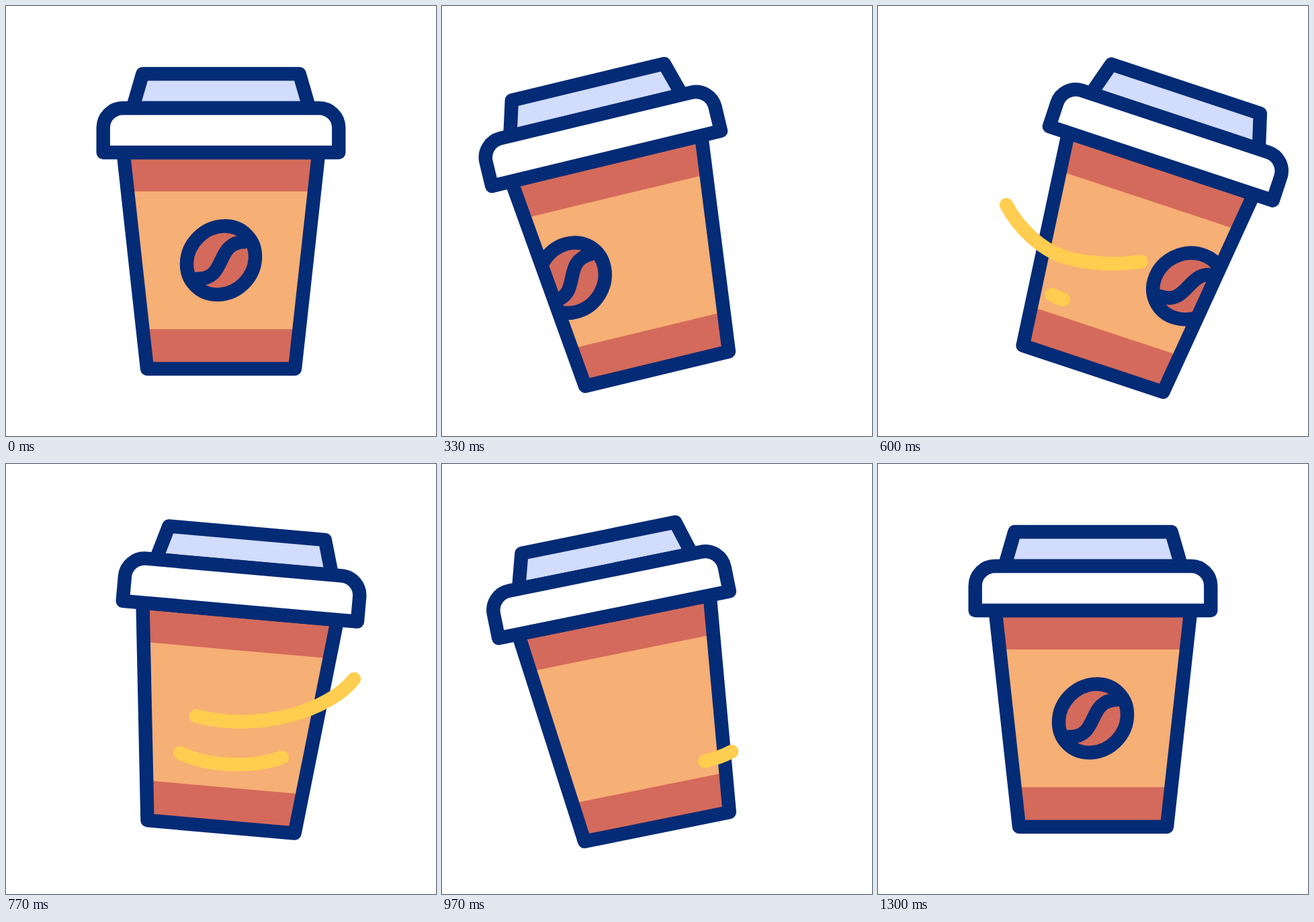
An HTML page for the animation above (2000 ms loop, 640x640 px).

```html
<!DOCTYPE html>
<html lang="en">
<head>
<meta charset="utf-8">
<title>Coffee cup</title>
<style>
  html, body { margin: 0; height: 100%; overflow: hidden; background: #fff; }
  svg { display: block; width: 100%; height: 100%; }
  .line { stroke: #042b76; stroke-width: 20.4; stroke-linejoin: round; stroke-linecap: round; }
  .swoosh { fill: none; stroke: #ffcd4f; stroke-width: 20.4; stroke-linecap: round; }
</style>
</head>
<body>
<svg viewBox="0 0 640 640">
  <clipPath id="body"><path d="M174.6 218H465.4L430 540H210Z"/></clipPath>
  <g id="cup">
    <g clip-path="url(#body)">
      <path fill="#d46a5b" d="M160 210H480V545H160Z"/>
      <path fill="#f6af74" d="M160 276H480V481H160Z"/>
      <g id="bean" class="line" fill="#d46a5b">
        <ellipse rx="53.7" ry="48.2" transform="translate(320 378.6) rotate(-45)"/>
        <path fill="none" d="M284 406C330 408 310 351 356 351"/>
      </g>
    </g>
    <g class="line">
      <path fill="none" d="M174.6 218H465.4L430 540H210Z"/>
      <path fill="#d2dcfd" d="M188.5 152L203.3 101H436.7L451.5 152Z"/>
      <path fill="#fff" d="M144.7 218V181.5A29.3 29.3 0 0 1 174 152H466A29.3 29.3 0 0 1 495.3 181.5V218Z"/>
    </g>
  </g>
  <path class="swoosh" d="M191 296C208 328 243 366 286 376C380 399 482 366 518 320"/>
  <path class="swoosh" d="M259 430C305 452 380 455 431 428"/>
</svg>
<script>
  const LOOP = 2000;
  const cup = document.getElementById('cup');
  const bean = document.getElementById('bean');
  const swooshes = [...document.querySelectorAll('.swoosh')].map((path, i) => ({
    path, length: path.getTotalLength(), delay: i * 3.3
  }));

  // Keys are [time in 1/30 s, value]
  const TILT = [[0, 0], [8.65, -15.3], [18.4, 18.5], [28.3, -11.6], [39, 0]];
  const SLIDE = [[1.2, 0], [8.8, -97], [24.1, 200], [24.1, -200], [28.3, -200], [39, 0]];

  const ease = (a, b, t) => {
    const s = Math.min(1, Math.max(0, (t - a) / (b - a)));
    return s * s * (3 - 2 * s);
  };

  function valueAt(keys, t) {
    const i = keys.findIndex(key => key[0] > t);
    if (i === 0) return keys[0][1];
    if (i < 0) return keys[keys.length - 1][1];
    const [a, from] = keys[i - 1], [b, to] = keys[i];
    return from + (to - from) * ease(a, b, t);
  }

  function drawSwoosh({ path, length, delay }, t) {
    const head = length * ease(13, 21.6, t - delay);
    const tail = length * ease(19.5, 28.6, t - delay);
    const visible = head - tail > 0.01;
    path.style.display = visible ? '' : 'none';
    if (!visible) return;
    path.style.strokeDasharray = `${head - tail} ${2 * length}`;
    path.style.strokeDashoffset = -tail;
  }

  function draw() {
    // Motion runs at 30 steps per second, timed to the nearest 10 ms
    const ms = performance.now() % LOOP;
    const t = Math.floor((Math.floor(ms / 10) * 10 + 4) * 0.03);
    cup.setAttribute('transform', `rotate(${valueAt(TILT, t)} 320 540)`);
    bean.setAttribute('transform', `translate(${valueAt(SLIDE, t)} 0)`);
    swooshes.forEach(swoosh => drawSwoosh(swoosh, t));
    requestAnimationFrame(draw);
  }
  draw();
</script>
</body>
</html>
```
